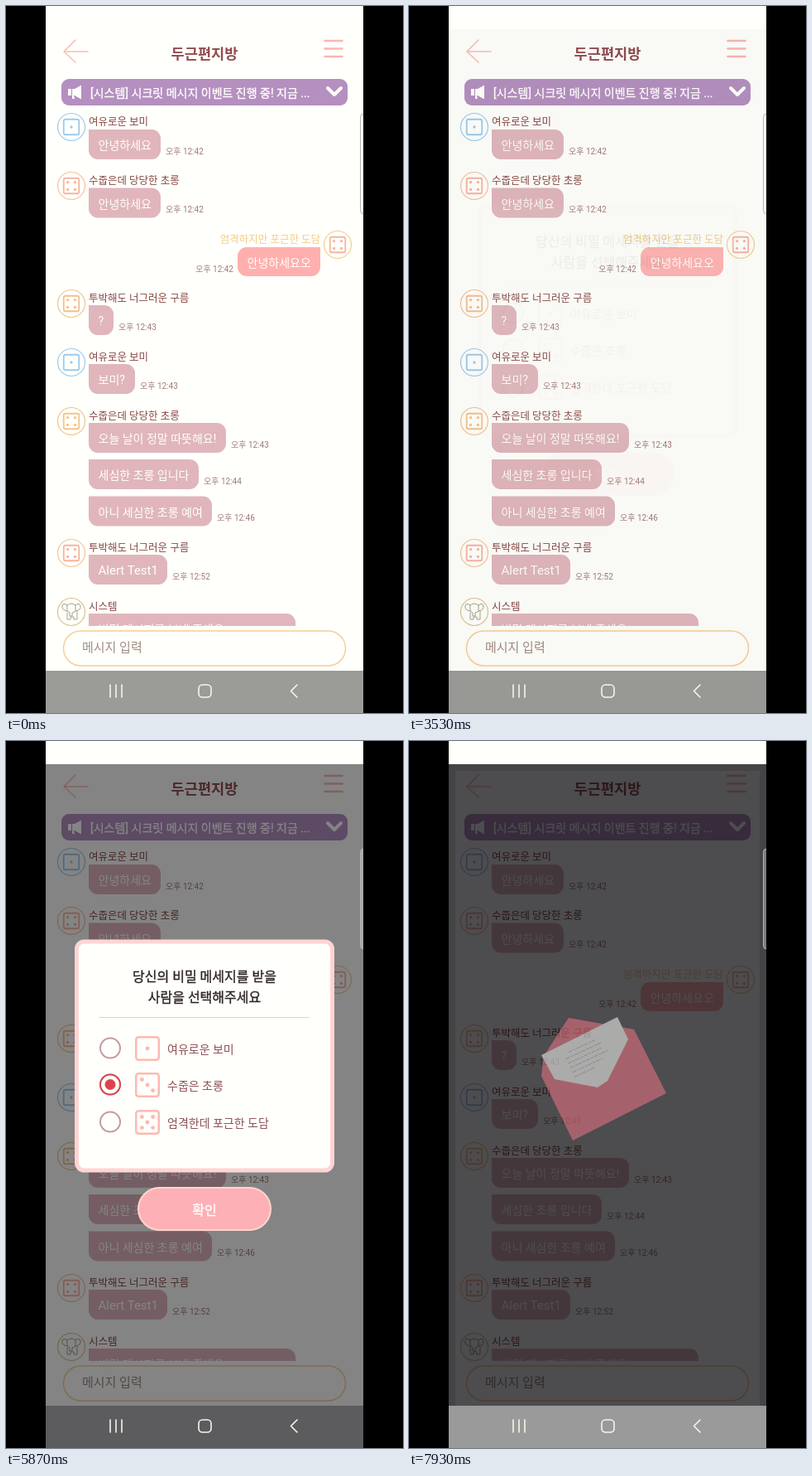
Animation, 480 px wide and 853 px high, one loop 8000 ms. Source, as an HTML page:

```html
<!DOCTYPE html>
<html lang="ko">
<head>
<meta charset="utf-8">
<title>채팅</title>
<style>
  html, body { margin: 0; width: 100%; height: 100%; overflow: hidden; background: #000; }
  svg { display: block; width: 100vw; height: 100vh; font-family: Roboto, "Noto Sans CJK KR", "Noto Sans CJK", sans-serif; }
  .line { fill: none; stroke-linecap: round; stroke-linejoin: round; }
  .shade { mix-blend-mode: multiply; }
  .shade, .dialog, .letter, .checked { opacity: 0; }
</style>
</head>
<body>
<svg id="stage" viewBox="0 0 480 853" preserveAspectRatio="none"></svg>
<script>
const LOOP = 8000;
const WHITE = '#fffffc';

const text = (x, y, str, size, fill, extra = '') =>
  `<text x="${x}" y="${y}" font-size="${size}" fill="${fill}" ${extra}>${str}</text>`;
// Medium weight, drawn as a regular face with a hairline outline.
const mediumText = (x, y, str, size, fill, extra = '') =>
  text(x, y, str, size, fill, `stroke="${fill}" stroke-width=".35" ${extra}`);
const line = (d, stroke, width, extra = '') =>
  `<path class="line" d="${d}" stroke="${stroke}" stroke-width="${width}" ${extra}/>`;
const rect = (x, y, w, h, r, fill, extra = '') =>
  `<rect x="${x}" y="${y}" width="${w}" height="${h}" rx="${r}" fill="${fill}" ${extra}/>`;
const circle = (x, y, r, fill, extra = '') =>
  `<circle cx="${x}" cy="${y}" r="${r}" fill="${fill}" ${extra}/>`;

// Pip positions on a grid around the die's centre.
const CORNERS = [[-1, -1], [1, 1], [1, -1], [-1, 1]];
const PIPS = {
  1: [[0, 0]],
  3: [[0, 0], ...CORNERS.slice(0, 2)],
  4: CORNERS,
  5: [[0, 0], ...CORNERS],
};

function die(x, y, size, pips, color, width) {
  const step = size * 0.24;
  return rect(x - size / 2, y - size / 2, size, size, size / 9, 'none',
      `stroke="${color}" stroke-width="${width}"`) +
    PIPS[pips].map(([i, j]) => circle(x + i * step, y + j * step, size * 0.09, color)).join('');
}

function avatar(x, y, pips, ring, color) {
  return circle(x, y, 16.5, WHITE, `stroke="${ring}" stroke-width="1.2"`) +
    die(x, y, 18.5, pips, color, 1.8);
}

function bubble(top, width, str, time, size = 14) {
  return `<path fill="#e0b6bc" d="M100 ${top}h${width - 11}a11 11 0 0 1 11 11v14a11 11 0 0 1-11 11h${22 - width}a11 11 0 0 1-11-11z"/>` +
    text(111.5, top + 24, str, size, WHITE) +
    (time ? text(106 + width, top + 29.5, '오후 ' + time, 10, '#a07c74') : '');
}

const nameTag = (y, name) => text(100, y - 2, name, 12.5, '#874742');

const BLUE = '#9ccbec', PEACH = '#f8b59e', GOLD = '#f3c48a';
const posts = [
  [146, '여유로운 보미', 1, BLUE, BLUE, [[149, 87, '안녕하세요', '12:42']]],
  [217, '수줍은데 당당한 초롱', 4, '#f5c29c', PEACH, [[219.5, 87, '안녕하세요', '12:42']]],
  [359, '투박해도 너그러운 구름', 4, GOLD, '#f5bf90', [[361, 30, '?', '12:43']]],
  [430, '여유로운 보미', 1, BLUE, BLUE, [[432, 56, '보미?', '12:43']]],
  [501, '수줍은데 당당한 초롱', 4, GOLD, GOLD, [
    [503, 166, '오늘 날이 정말 따뜻해요!', '12:43'],
    [547, 133, '세심한 초롱 입니다', '12:44'],
    [591.5, 149, '아니 세심한 초롱 예여', '12:46'],
  ]],
  [660, '투박해도 너그러운 구름', 4, '#f5c592', PEACH, [[662, 95, 'Alert Test1', '12:52', 15]]],
];

const chat = posts.map(([y, name, pips, ring, color, messages]) =>
  avatar(79, y, pips, ring, color) + nameTag(y, name) +
  messages.map(m => bubble(...m)).join('')).join('');

const ownPost = avatar(401, 288, 4, '#f3cf8c', PEACH) +
  text(380, 286, '엄격하지만 포근한 도담', 12.5, '#f4cd84', 'text-anchor="end"') +
  '<path fill="#ffb0ae" d="M291 291h89v24a11 11 0 0 1-11 11h-78a11 11 0 0 1-11-11v-13a11 11 0 0 1 11-11z"/>' +
  text(291.5, 315, '안녕하세요오', 14, WHITE) +
  text(275, 320.5, '오후 12:42', 10, '#a07c74', 'text-anchor="end"');

const systemPost = circle(79, 731, 16.5, WHITE, 'stroke="#d8c48c" stroke-width="1.2"') +
  line('M74 723q-5-4-6 1t6 6M84 723q5-4 6 1t-6 6M74 723q5-4 10 0v7q-2 2-4 2v4h-3v-4q-3-1-3-3zM74 732v8h4v-3h4v3h4v-10', '#a8a088', 1) +
  nameTag(731, '시스템') +
  `<g clip-path="url(#chatArea)">${bubble(733, 250, '비밀 메시지를 보내 주세요')}</g>`;

const header = line('M99 55H70L84 41M70 55L84 68', '#fbbfb4', 1.6) +
  text(240, 64, '두근편지방', 17.6, '#924c50', 'text-anchor="middle" font-weight="700"') +
  line('M385.500 42h21M385.500 51.500h21M385.500 61h21', '#fbb6b0', 2.5);

const notice = rect(67, 88, 346, 32, 9, '#b48fc0') +
  `<path fill="${WHITE}" d="M75 100h4v8h-4zM80 100h3l8-4.500v17l-8-4.500h-1l1 4h-3z"/>` +
  mediumText(102, 110, '[시스템] 시크릿 메시지 이벤트 진행 중! 지금 ...', 14, WHITE) +
  line('M389 99l8 8 8-8', WHITE, 4);

const input = rect(69.5, 754, 341, 42, 21, WHITE, 'stroke="#f6cf98" stroke-width="1.5"') +
  text(92, 778.5, '메시지 입력', 15, '#a08c80');

const choices = [[371, 1, '여유로운 보미'], [415, 3, '수줍은 초롱'], [460, 5, '엄격한데 포근한 도담']];
const option = ([y, pips, name]) =>
  circle(126, y - 0.5, 12, 'none', 'stroke="#c49aa0" stroke-width="2"') +
  die(171, y, 27.5, pips, '#ffb9b0', 2.5) +
  text(195, y + 6, name, 14, '#8f5054');

const dialog = rect(85.5, 242, 309, 276, 9, WHITE, 'stroke="#ffd4d4" stroke-width="5"') +
  ['당신의 비밀 메세지를 받을', '사람을 선택해주세요'].map((s, i) =>
    mediumText(240, 290 + 25 * i, s, 16, '#2c2424', 'text-anchor="middle"')).join('') +
  '<path d="M113 333.500H367" stroke="#e6d3b4"/>' +
  choices.map(option).join('') +
  `<g class="checked">${circle(126, 414.5, 12, WHITE, 'stroke="#d9444c" stroke-width="2"')}${circle(126, 414.5, 6.5, '#df444c')}</g>` +
  rect(160, 539, 160, 51, 25.5, '#fdb0b5', 'stroke="#ffd6cc" stroke-width="2"') +
  mediumText(240, 571.5, '확인', 16, WHITE, 'text-anchor="middle"');

const letterLines = [0, 1, 2, 3, 4, 5].map(i =>
  `<path d="M${i ? -24 : -18} ${i * 6}h${[36, 48, 44, 50, 40, 28][i]}" stroke="#c4bfc0" stroke-dasharray="5 1.500 3 1"/>`).join('');
const letter = '<path fill="#f57786" d="M193 334L272 348 311 425 198 482 160 404 163 380z"/>' +
  `<path fill="${WHITE}" d="M160 379L252 333 265 360 240 410 228 418 176 408z"/>` +
  `<g transform="translate(209 368) rotate(-25)">${letterLines}</g>`;

const navIcons = line('M126 819v15M133 819v15M140 819v15M352 819l-7.500 7.500 7.500 7.500', '#f6f6ea', 1.6) +
  rect(233, 819, 15, 15, 4.5, 'none', 'stroke="#f6f6ea" stroke-width="1.6"');

const stage = document.getElementById('stage');
stage.innerHTML = `
  <defs>
    <clipPath id="chatArea"><rect x="48" y="120" width="384" height="628"/></clipPath>
    <clipPath id="phone"><rect x="48" width="384" height="853"/></clipPath>
  </defs>
  ${rect(48, 0, 384, 853, 0, WHITE)}
  ${header}${notice}${chat}${ownPost}${systemPost}${input}
  <g class="shade night">
    ${rect(48, 28, 384, 774, 0, '#4d4c50')}
    <path fill="none" stroke="#000" stroke-opacity=".12" stroke-width="8" d="M52 802V32H428V802"/>
  </g>
  <g class="letter">${letter}</g>
  <g class="shade dim">${rect(48, 28, 384, 774, 0, '#848486')}</g>
  <g class="dialog">${dialog}</g>
  ${rect(48, 802, 384, 51, 0, '#9b9b98', 'class="nav"')}
  ${navIcons}
  <g clip-path="url(#phone)">${rect(428.5, 130, 12, 121, 4, '#fff', 'fill-opacity=".3" stroke="#b6b6b0"')}</g>`;

// Each track is a list of [milliseconds, value].
function play(selector, property, track) {
  const steps = [[0, track[0][1]], ...track, [LOOP, track[track.length - 1][1]]];
  stage.querySelector(selector).animate(
    steps.map(([ms, value]) => ({ offset: ms / LOOP, [property]: value })),
    { duration: LOOP, iterations: Infinity });
}

const modal = [[3515, 0], [3810, 1], [7300, 1], [7600, 0]];
play('.dim', 'opacity', modal);
play('.dialog', 'opacity', modal);
play('.checked', 'opacity', [[5270, 0], [5270, 1]]);
play('.night', 'opacity', [[7200, 0], [7300, 1]]);
play('.letter', 'opacity', [[7700, 0], [7930, 0.53], [7999, 0.7]]);
play('.nav', 'fill', [[3515, '#9b9b98'], [3810, '#5c5c5f'], [7300, '#5c5c5f'], [7330, '#6f6f70'], [7600, '#9a9a9a']]);
</script>
</body>
</html>
```
